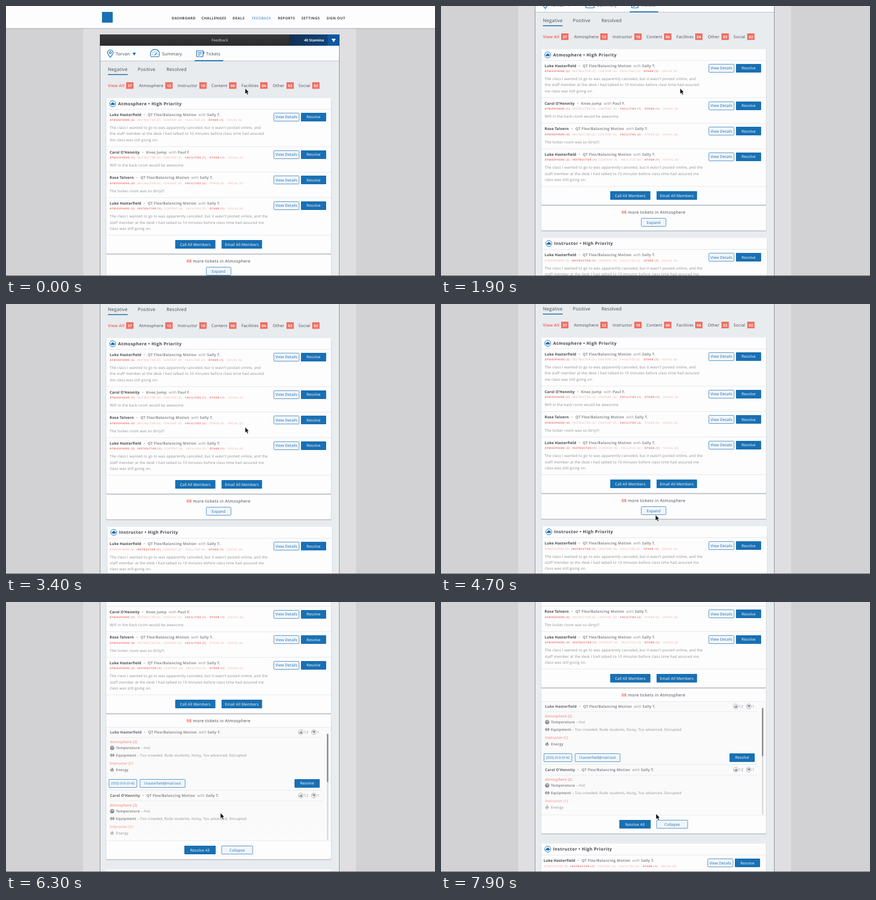
Animation, 800 px wide and 503 px high, one loop 8 s. Source, as an HTML page:

```html
<!DOCTYPE html>
<html lang="en">
<head>
<meta charset="utf-8">
<title>Feedback tickets</title>
<style>
  html, body { margin: 0; width: 100%; height: 100%; overflow: hidden; }
  svg { display: block; width: 100vw; height: 100vh; font-family: "Open Sans", sans-serif; }
  text { white-space: pre; text-rendering: geometricPrecision; }
  .b { font-weight: 700; }
  .m { text-anchor: middle; }
  .e { text-anchor: end; }
</style>
</head>
<body>
<svg id="stage" viewBox="0 0 800 503"></svg>
<script>
const BLUE = '#1970b3', CORAL = '#ee6f63', DARK = '#45464b', GREY = '#8b8c90';

// y is the middle of the capitals
const text = (x, y, s, size, fill, ls = 0.18, cls = '') =>
  `<text x="${x}" y="${y + size * 0.36}" font-size="${size}" fill="${fill}" letter-spacing="${ls}" class="${cls}">${s}</text>`;
const rect = (x, y, w, h, fill, extra = '') =>
  `<rect x="${x}" y="${y}" width="${w}" height="${h}" fill="${fill}" ${extra}/>`;
const line = (x1, x2, y, color = '#e3e4e7', w = 1) => rect(x1, y - w / 2, x2 - x1, w, color);
const path = (d, extra) => `<path d="${d}" ${extra}/>`;
const stroke = `fill="none" stroke="${BLUE}" stroke-width="1.2"`;

// button centred on y, its box snapped to whole pixels
function button(x, y, w, label, filled, size = 7.1) {
  const top = Math.round(y) - 8;
  const box = filled ? rect(x, top, w, 16, BLUE, 'rx="1"')
    : rect(x + 0.5, top + 0.5, w - 1, 15, '#f1f5fa', 'rx="1" stroke="#3f87c0" stroke-width=".9"');
  return box + text(x + w / 2, y, label, size, filled ? '#fff' : BLUE, 0.1, 'm');
}

const card = (x, y, w, h) =>
  rect(x - 0.5, y + 1, w + 1, h + 1, '#c5c8cd', 'rx="1.5"') + rect(x, y, w, h, '#fdfdfe', 'rx="1.5"');

const cardTitle = (x, y, s) =>
  `<circle cx="${x + 12}" cy="${y}" r="5.6" fill="#fff" stroke="${BLUE}"/>` +
  path(`M${x + 9.8} ${y + 2.4}a1.7 1.7 0 0 1 0-3.4a2.3 2.3 0 0 1 4.3-.5a2 2 0 0 1 .4 3.9z`, `fill="${BLUE}"`) +
  text(x + 22, y, s + ' • High Priority', 8, DARK, 0.46, 'b');

const PEOPLE = {
  luke: ['Luke Hasterfield', 71, 'QT Flex/Balancing Motion', 94.5, 'Sally T.'],
  carol: ['Carol O’Hennity', 68, 'Knee Jump', 42.5, 'Paul F.'],
  carolList: ['Carol O’Hennity', 68, 'QT Flex/Balancing Motion', 94.5, 'Sally T.'],
  rose: ['Rose Talvern', 57.5, 'QT Flex/Balancing Motion', 94.5, 'Sally T.'],
};

function heading(x, y, key, color = DARK) {
  const [name, dx, course, dw, coach] = PEOPLE[key], cx = x + dx;
  return text(x, y, name, 6.8, color, 0.18, 'b') + text(cx - 7.8, y, '•', 6.8, GREY) +
    text(cx, y, course, 6.8, GREY, 0.18, 'b') +
    text(cx + dw, y, `with <tspan class="b">${coach}</tspan>`, 6.8, GREY);
}

const TAGS = ['ATMOSPHERE', 'INSTRUCTOR', 'CONTENT', 'FACILITIES', 'OTHER', 'SOCIAL'];
const tags = (x, y, counts) => text(x, y, TAGS.map((tag, i) => {
  const n = counts[i], dx = [0, 4.4, 4.4, 6.2, 6.2, 6.2][i];
  return `<tspan dx="${dx}" class="${n ? 'b' : ''}" fill="${n ? CORAL : '#f0958c'}">${tag} (${n})</tspan>`;
}).join(''), 4.8, CORAL, 0.56);

const ticket = (y, key, counts, lines) =>
  heading(193.3, y, key) + tags(193.5, y + 10, counts) +
  lines.map((s, i) => text(193.5, y + 24.4 + i * 11.4, s, 6.8, GREY, 0.185)).join('') +
  button(499, y + 4.3, 48, 'View Details') + button(550, y + 4.3, 47, 'Resolve', true);

const STORY = ['The class I wanted to go to was apparently canceled, but it wasn’t posted online, and',
  'the staff member at the desk I had talked to 10 minutes before class time had assured', 'me class was still going on.'];
const STORY_WIDE = [STORY[0] + ' the',
  'staff member at the desk I had talked to 10 minutes before class time had assured me', 'class was still going on.'];

const thumb = (x, y, flip) =>
  `<g transform="translate(${x} ${y}) scale(1 ${flip})"><circle r="4.5" fill="none" stroke="${GREY}" stroke-width=".7"/>` +
  path('M-2.6-.3h1.3v2.7h-1.3zM-.9-.3L.5-2.8q1 .2.4 2.1h1.8l-.5 3.1h-3.1z', `fill="${GREY}"`) + '</g>';

function detail(y, key) {
  const fact = (dy, label, rest) =>
    text(205, y + dy, `<tspan class="b">${label}</tspan>${rest}`, 6.6, GREY, 0.2);
  return heading(194, y, key, '#606167') +
    thumb(549.8, y, 1) + text(555.5, y, '12', 7, GREY) + thumb(574, y, -1) + text(580, y, '1', 7, GREY) +
    line(194, 590, y + 10, '#ececee') +
    text(194, y + 18, 'Atmosphere (2)', 6.8, CORAL, 0.15) +
    `<circle cx="198" cy="${y + 29.3}" r="4" fill="${GREY}"/>` +
    path(`M195.5 ${y + 29}a2.5 2 0 0 1 5 0M198 ${y + 30}l1.3-2`, 'fill="none" stroke="#fff" stroke-width=".7"') +
    fact(29.5, 'Temperature', ' – Hot') +
    rect(194, y + 41.4, 1.2, 3.2, GREY) + rect(195.6, y + 40, 1.6, 6, GREY) + rect(197, y + 42.4, 2.4, 1.2, GREY) +
    rect(199, y + 40, 1.6, 6, GREY) + rect(201, y + 41.4, 1.2, 3.2, GREY) +
    fact(43, 'Equipment', ' – Too crowded, Rude students, Noisy, Too advanced, Disrupted') +
    text(194, y + 58.5, 'Instructor (1)', 6.8, CORAL, 0.15) +
    path(`M198 ${y + 65}q.2 2 2 3.5q1.8 3-.5 4.8q-2.8 1-4.3-.8q-1.6-2.6.6-4.5q.2 1.3 1 1.5q.6-2.5 1.2-4.5zM197.8 ${y + 70}q-2 2 0 3.2q2-.6 0-3.2z`,
      `fill="${GREY}" fill-rule="evenodd"`) +
    fact(70, 'Energy', '') +
    button(191.5, y + 95, 53, '(555) 010-0142', false, 6.2) +
    button(249.5, y + 95, 85, 'l.hasterfield@mail.test', false, 6.4) +
    button(538, y + 95, 47, 'Resolve', true) + line(188, 590, y + 108, '#e8e8ea');
}

function header() {
  const nav = [[309, 'DASHBOARD'], [364.5, 'CHALLENGES'], [422.5, 'DEALS'], [458.7, 'FEEDBACK'],
    [507, 'REPORTS'], [551, 'SETTINGS'], [597.7, 'SIGN OUT']];
  return rect(0, 0, 800, 41.5, '#fdfdfe') + line(0, 800, 42, '#a9a9ac') + rect(179, 11, 20, 20, BLUE) +
    nav.map(([x, s]) => s === 'FEEDBACK' ? text(x, 23, s, 6.6, BLUE, 0.5) : text(x, 22.7, s, 6.6, DARK, 0.4, 'b')).join('');
}

function toolbar() {
  const filters = [[190, 224, 'View All', 37], [248, 297, 'Atmosphere', 12], [320, 360.5, 'Instructor', 10],
    [383, 416, 'Content', '06'], [439, 474, 'Facilities', '04'], [497.5, 523, 'Other', '03'], [545.5, 571, 'Social', '02']];
  return rect(175, 53, 447, 21, 'url(#bar)') + rect(528, 53, 72, 21, 'url(#navy)') + rect(600, 53, 22, 21, '#0e57a2') +
    text(398.7, 63.7, 'Feedback', 6.7, '#e6e6e6', 0.15, 'm') +
    text(593, 63.7, '40 Stamina', 6.6, '#fff', 0.05, 'b e') +
    path('M607 61h8l-4 6.5z', 'fill="#fff"') +
    rect(176, 74, 445, 28.5, '#fcfdfe') + line(176, 621, 102.5, '#b9bdc3') +
    path('M194.5 95.5Q189.3 89.5 189.3 87a5.2 5.2 0 0 1 10.4 0Q199.7 89.5 194.5 95.5z', stroke) +
    `<circle cx="194.5" cy="87" r="1.9" ${stroke}/>` +
    text(204.7, 89, 'Torvan', 8, DARK, 0.2) + path('M236 87h6.4l-3.2 5.3z', `fill="${BLUE}"`) +
    path('M271 94.5A8.5 8.5 0 1 1 284.5 94.5zM277 92l4.5-5M272 90h1.5M278 84.5v1.5M273.8 86l1 1M282.5 90h1.5', stroke) +
    text(291, 89, 'Summary', 8, DARK, 0.2) +
    path('M355.5 83.5h12v9q0 2-2 2h-8q-2 0-2-2zM367.5 85.5h1.5v3h-1.5M358 86.5h7M358 89h7M358 91.5h4', stroke) +
    text(373, 89, 'Tickets', 8, DARK, 0.2) + line(352, 405, 102, BLUE, 2) +
    text(190, 118.3, 'Negative', 8.6, DARK, 0.22) + text(245.8, 118.3, 'Positive', 8.6, DARK, 0.22) +
    text(299.3, 118.3, 'Resolved', 8.6, DARK, 0.22) + line(190, 227, 127.7, BLUE, 1.6) +
    filters.map(([x, bx, s, n], i) => text(x, 148.3, s, i ? 7.6 : 7.4, i ? DARK : CORAL, 0.22, i ? '' : 'b') +
      rect(bx, 142, 13.7, 12.3, CORAL) + text(bx + 6.9, 148.2, n, 6.6, '#fff', 0.1, 'b m')).join('');
}

const atmosphere = () => card(187, 171.5, 419, 289.5) + cardTitle(187, 182.2, 'Atmosphere') +
  [192.5, 262, 309.5, 357, 427].map(y => line(187, 606, y, '#e6e7ea')).join('') +
  ticket(202.2, 'luke', [2, 0, 0, 0, 1, 0], STORY) +
  ticket(272.2, 'carol', [1, 0, 0, 1, 1, 0], ['Wifi in the back room would be awesome']) +
  ticket(319.8, 'rose', [4, 0, 0, 2, 0, 0], ['The locker room was so dirty!!!']) +
  ticket(367.3, 'luke', [2, 1, 0, 0, 1, 0], STORY_WIDE) +
  button(315.5, 444.2, 75, 'Call All Members', true) + button(402, 444.2, 75.5, 'Email All Members', true);

const more = () => '<g id="more"></g>' +
  text(396.3, 475.2, `<tspan class="b" fill="${CORAL}">08</tspan> more tickets in Atmosphere`, 7.8, DARK, 0.28, 'm') +
  `<g id="expand">${button(373, 494, 47, 'Expand')}</g>` +
  `<g clip-path="url(#reveal)">${rect(187, 487, 419, 212.5, '#fafafb')}${line(187, 606, 487.3)}` +
  detail(496.5, 'luke') + detail(614.5, 'carolList') + rect(187, 664, 419, 36, 'url(#fade)') + line(187, 606, 699) +
  rect(598.5, 499.5, 2.6, 198, '#d9d9db') + rect(598.5, 499.5, 2.6, 90, '#88898c', 'rx="1"') + '</g>' +
  `<g id="actions">${button(332.5, 716, 58.5, 'Resolve All', true)}${button(401.5, 716, 59, 'Collapse')}</g>`;

const instructor = () => `<g id="next">${card(189, 523, 419, 130)}${cardTitle(189, 533.4, 'Instructor')}` +
  line(189, 608, 544.3) + ticket(554.8, 'luke', [0, 1, 0, 0, 1, 0], STORY_WIDE) + '</g>';

const gradient = (id, a, b, dir = 'x2="0" y2="1"') =>
  `<linearGradient id="${id}" ${dir}><stop ${a}/><stop offset="1" ${b}/></linearGradient>`;

const $ = id => document.getElementById(id);
$('stage').innerHTML = '<defs>' +
  gradient('bar', 'stop-color="#393738"', 'stop-color="#2b2a2c"') +
  gradient('navy', 'stop-color="#123052"', 'stop-color="#104479"', '') +
  gradient('fade', 'stop-color="#fdfdfe" stop-opacity="0"', 'stop-color="#fdfdfe" stop-opacity=".6"') +
  '<clipPath id="reveal"><rect id="window" x="187" y="487" width="419"/></clipPath></defs>' +
  rect(0, 0, 800, 503, '#d2d1d4') + rect(144, 0, 509, 503, '#dfdee0') +
  '<g id="page">' + rect(175, 53, 447, 900, '#8b909b') + rect(176, 53, 445, 900, '#e9ecef') +
  header() + toolbar() + atmosphere() + more() + instructor() + '</g>' + line(0, 800, 502.5, '#5d5d60') +
  path('M0 0V10.3L2.4 8.2L4.1 12L5.8 11.2L4.2 7.5H7.2z', 'id="cursor" fill="#000" stroke="#fff" stroke-width=".6"');

// [time, value] keys
const SCROLL = [[1000, 0], [1300, 34], [1600, 67], [1900, 90.5], [2300, 104], [2800, 108], [3600, 108],
  [4500, 109], [5700, 109], [6000, 178], [6300, 254], [6600, 287], [6900, 299], [7200, 301.7]];
const CURSOR_X = [[3400, 446], [4300, 400], [6400, 400], [7200, 401]];
const CURSOR_Y = [[2800, 153.5], [3400, 229.5], [4300, 393], [6400, 393], [7200, 394.5]];
// 0 is collapsed, 1 expanded
const OPEN = [[4800, 0], [4900, 0.25], [5000, 0.6], [5100, 0.85], [5300, 1]];

function at(keys, t) {
  const i = keys.findIndex(k => k[0] >= t);
  if (i === 0) return keys[0][1];
  if (i < 0) return keys[keys.length - 1][1];
  const [t0, a] = keys[i - 1], [t1, b] = keys[i];
  return a + (b - a) * (t - t0) / (t1 - t0);
}

function draw(now) {
  const t = Math.floor(now % 8000 / 100) * 100, open = at(OPEN, t);
  const move = (id, x, y) => $(id).setAttribute('transform', `translate(${x} ${y})`);
  move('page', 0, -Math.round(at(SCROLL, t)));
  move('cursor', at(CURSOR_X, t), at(CURSOR_Y, t));
  move('next', -2 * open, 229 * open);
  move('actions', 0, -224 * (1 - open));
  $('more').innerHTML = card(187, 464, 419, 45 + 224 * open);
  $('window').setAttribute('height', 212.5 * open);
  $('expand').setAttribute('opacity', open ? 0 : 1);
  $('actions').setAttribute('opacity', open);
  requestAnimationFrame(draw);
}
requestAnimationFrame(draw);
</script>
</body>
</html>
```
